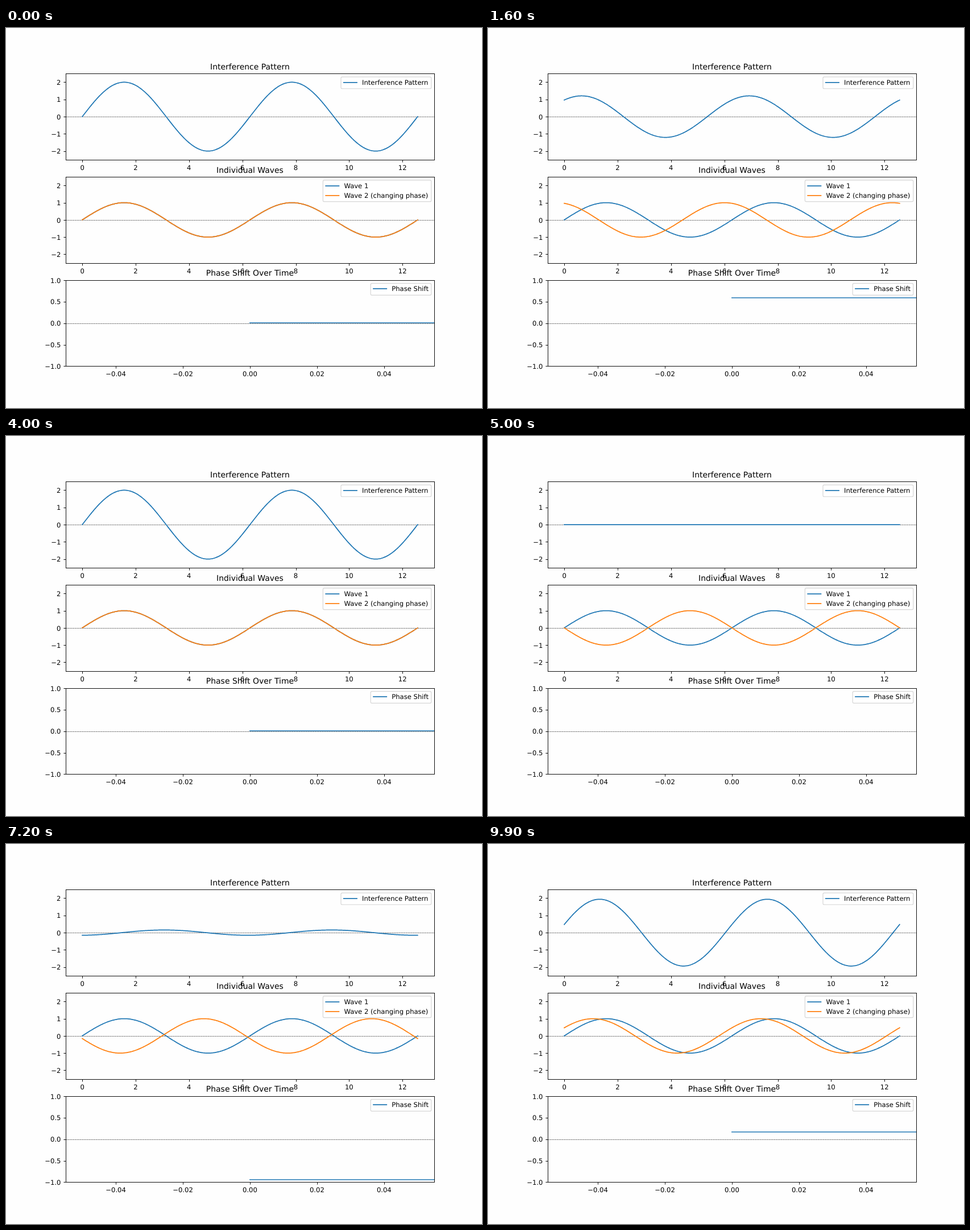
Animation of 837x669 px, one loop 10000 ms. Source, as an HTML page:

```html
<!DOCTYPE html>
<html lang="en">
<head>
<meta charset="utf-8">
<title>Wave interference</title>
<style>
  html, body { margin: 0; width: 100%; height: 100%; overflow: hidden; background: #fefefe; }
  svg { display: block; width: 837px; height: 669px; }
  text { font-family: "DejaVu Sans", sans-serif; font-size: 11.625px; text-rendering: geometricPrecision; }
  .title { font-size: 13.95px; }
  .line { fill: none; stroke-width: 1.744; stroke-linecap: square; stroke-linejoin: round; }
  .frame { fill: none; stroke: #000; stroke-width: .93; }
  .zero { stroke: #000; stroke-width: .58; stroke-dasharray: 2.15 .93; }
  .legend { fill: #fff; fill-opacity: .8; stroke: #ccc; stroke-opacity: .8; stroke-width: 1.1625; }
</style>
</head>
<body>
<svg id="stage" viewBox="0 0 837 669"></svg>
<script>
const STEP = 100, STEPS = 100;
const BLUE = '#1f77b4', ORANGE = '#ff7f0e';
const LEFT = 104.625, RIGHT = 753.3, CENTER = (LEFT + RIGHT) / 2;
const TOP = 80.28, HEIGHT = 151.51, GAP = HEIGHT / 5;
const X_END = 4 * Math.PI, SAMPLES = 500;
const stage = document.getElementById('stage');

function add(parent, tag, attrs, text) {
  const el = document.createElementNS('http://www.w3.org/2000/svg', tag);
  for (const key in attrs) el.setAttribute(key, attrs[key]);
  if (text !== undefined) el.textContent = text;
  parent.appendChild(el);
  return el;
}

// Thin lines sit on pixel centres.
const snap = v => Math.round(v) + 0.5;
const label = (v, digits) => v.toFixed(digits).replace('-', '\u2212');

function makePanel({ row, title, xMax, xMin, yMax, xTicks, yTicks, xDigits, yDigits, colors, legend }) {
  const top = TOP + row * (HEIGHT + GAP), bottom = top + HEIGHT;
  const px = x => LEFT + (x - xMin) / (xMax - xMin) * (RIGHT - LEFT);
  const py = y => top + (yMax - y) / (2 * yMax) * HEIGHT;
  const g = add(stage, 'g', {});
  const id = 'clip' + row;
  const x1 = snap(LEFT), x2 = snap(RIGHT), y1 = snap(top), y2 = snap(bottom);
  const box = { x: x1, y: y1, width: x2 - x1, height: y2 - y1 };

  add(add(g, 'clipPath', { id }), 'rect', box);
  let ticks = '';
  for (const v of xTicks) {
    ticks += `M${snap(px(v))} ${y2}v4.07`;
    add(g, 'text', { x: px(v), y: Math.round(bottom + 18), 'text-anchor': 'middle' }, label(v, xDigits));
  }
  for (const v of yTicks) {
    ticks += `M${x1} ${snap(py(v))}h-4.07`;
    add(g, 'text', { x: LEFT - 8.14, y: Math.round(py(v) + 4.7), 'text-anchor': 'end' }, label(v, yDigits));
  }
  add(g, 'path', { class: 'frame', d: ticks });
  add(g, 'path', { class: 'zero', d: `M${x1} ${snap(py(0))}H${x2}` });

  const plot = add(g, 'g', { 'clip-path': `url(#${id})` });
  const lines = colors.map(stroke => add(plot, 'path', { class: 'line', stroke }));
  add(g, 'rect', { class: 'frame', ...box });
  add(g, 'text', { class: 'title', x: CENTER, y: Math.round(top - 7.5), 'text-anchor': 'middle' }, title);

  add(g, 'rect', {
    class: 'legend', x: legend.x, y: top + 5.8, width: 747.8 - legend.x,
    height: 3.6 + 17.1 * legend.names.length, rx: 2.3
  });
  legend.names.forEach((name, i) => {
    const y = Math.floor(top + 16 + 17.2 * i);
    add(g, 'path', { class: 'line', stroke: colors[i], d: `M${legend.x + 4.8} ${y}h23.25` });
    add(g, 'text', { x: legend.x + 37, y: y + 4 }, name);
  });
  return { px, py, lines };
}

const waveAxes = {
  xMin: -0.05 * X_END, xMax: 1.05 * X_END, yMax: 2.5,
  xTicks: [0, 2, 4, 6, 8, 10, 12], yTicks: [-2, -1, 0, 1, 2], xDigits: 0, yDigits: 0
};
const sum = makePanel({
  ...waveAxes, row: 0, title: 'Interference Pattern', colors: [BLUE],
  legend: { x: 589, names: ['Interference Pattern'] }
});
const waves = makePanel({
  ...waveAxes, row: 1, title: 'Individual Waves', colors: [BLUE, ORANGE],
  legend: { x: 557.4, names: ['Wave 1', 'Wave 2 (changing phase)'] }
});
const shift = makePanel({
  row: 2, title: 'Phase Shift Over Time', colors: [BLUE],
  xMin: -0.055, xMax: 0.055, yMax: 1,
  xTicks: [-0.04, -0.02, 0, 0.02, 0.04], yTicks: [-1, -0.5, 0, 0.5, 1], xDigits: 2, yDigits: 1,
  legend: { x: 641.2, names: ['Phase Shift'] }
});

function drawCurve(panel, index, fn) {
  let d = '';
  for (let i = 0; i <= SAMPLES; i++) {
    const x = X_END * i / SAMPLES;
    d += (i ? 'L' : 'M') + panel.px(x).toFixed(2) + ' ' + panel.py(fn(x)).toFixed(2);
  }
  panel.lines[index].setAttribute('d', d);
}

function draw(step) {
  const level = Math.sin(step * Math.PI / 20);
  const phase = Math.PI * level;
  drawCurve(sum, 0, x => Math.sin(x) + Math.sin(x + phase));
  drawCurve(waves, 1, x => Math.sin(x + phase));
  const y = Math.floor(shift.py(level));
  shift.lines[0].setAttribute('d', `M${shift.px(0)} ${y}H${RIGHT + 5}`);
}

drawCurve(waves, 0, Math.sin);
draw(0);

const start = performance.now();
let shown = 0;
function tick() {
  const step = Math.floor((performance.now() - start) / STEP) % STEPS;
  if (step !== shown) draw(shown = step);
  requestAnimationFrame(tick);
}
requestAnimationFrame(tick);
</script>
</body>
</html>
```
